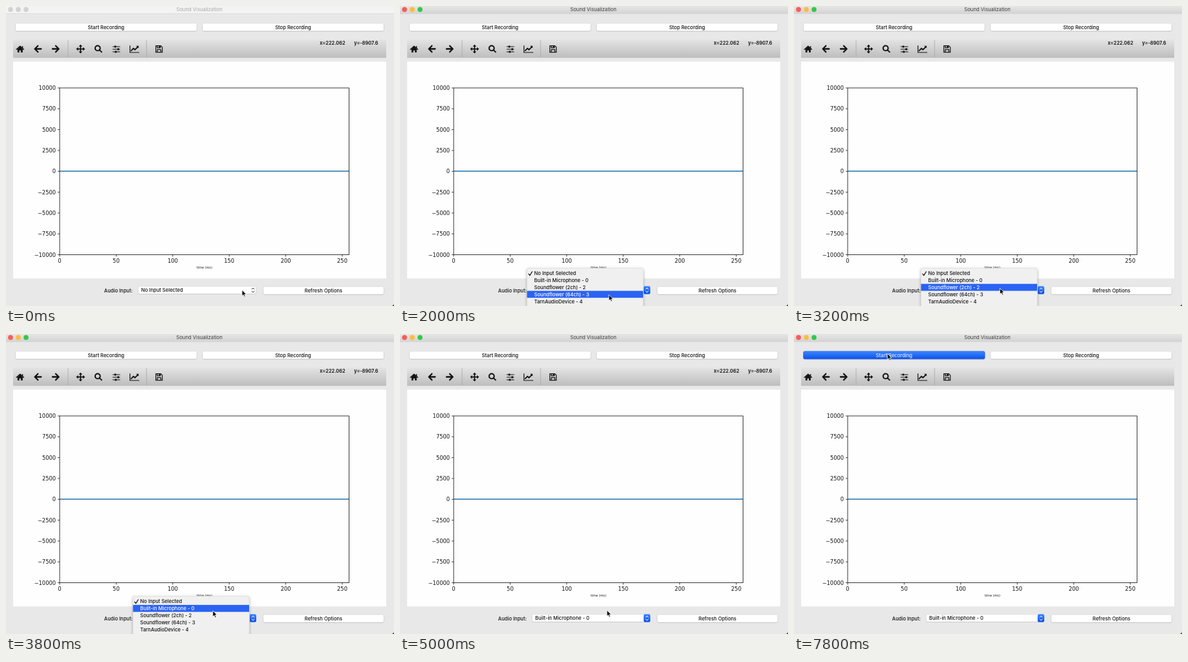
These frames come from a looping animation (600x465 px, 8000 ms). An HTML page:

```html
<!DOCTYPE html>
<html lang="en">
<head>
<meta charset="utf-8">
<title>Sound Visualization</title>
<style>
html, body { margin: 0; width: 100%; height: 100%; overflow: hidden; background: #e8e8e8; }
svg { display: block; width: 600px; height: 465px; }
text { font: 500 7.6px Inter, "Open Sans", sans-serif; fill: #111; white-space: pre; }
.title { font-weight: 400; font-size: 7.7px; }
.coord { font-weight: 600; font-size: 7.45px; }
.tick { font: 8.3px "DejaVu Sans", sans-serif; }
.axis { font: 5px "DejaVu Sans", sans-serif; }
.mid { text-anchor: middle; }
.end { text-anchor: end; }
.line { fill: none; stroke: #111; stroke-linecap: round; stroke-linejoin: round; }
</style>
</head>
<body>
<svg id="stage" viewBox="0 0 600 465">
  <defs>
    <linearGradient id="bar" x2="0" y2="1"><stop stop-color="#e6e5e6"/><stop offset="1" stop-color="#d4d3d4"/></linearGradient>
    <linearGradient id="tools" x2="0" y2="1"><stop stop-color="#e4e4e4"/><stop offset="1" stop-color="#bdbdbd"/></linearGradient>
    <linearGradient id="blue" x2="0" y2="1"><stop stop-color="#3f86fb"/><stop offset="1" stop-color="#0a51ee"/></linearGradient>
    <filter id="shade" x="-10%" y="-20%" width="120%" height="140%"><feDropShadow dx="0" dy="1.5" stdDeviation="2" flood-opacity=".3"/></filter>
  </defs>
</svg>
<script>
const NS = "http://www.w3.org/2000/svg";
const LOOP = 8000, STEP = 200;
const stage = document.getElementById("stage");

function add(tag, attrs, parent = stage) {
  const node = document.createElementNS(NS, tag);
  for (const key in attrs) node.setAttribute(key, attrs[key]);
  return parent.appendChild(node);
}
function rect(x, y, width, height, fill, extra, parent) {
  return add("rect", { x, y, width, height, fill, ...extra }, parent);
}
function label(str, x, y, cls = "", parent) {
  const node = add("text", { x, y, class: cls }, parent);
  node.textContent = str;
  return node;
}
function path(d, attrs, parent) {
  return add("path", { d, ...attrs }, parent);
}
function button(str, x, y, w) {
  rect(x, y + .6, w, 12.2, "#bcbcbc", { rx: 2.4 });
  const face = rect(x + .2, y + .1, w - .4, 12, "#fff", { rx: 2.2, stroke: "#cbcbcb", "stroke-width": .5 });
  const text = label(str, x + w / 2, y + 8.8, "mid");
  return { face, text };
}

// Window frame
rect(0, 0, 600, 465, "#e8e8e8");
const titleBar = rect(0, 0, 600, 12, "url(#bar)");
rect(0, 11.6, 600, .7, "#cfcfcf");
const lights = [7, 19, 31].map(cx => add("circle", { cx, cy: 5.4, r: 3.8 }));
const title = label("Sound Visualization", 299, 8.4, "title mid");

const start = button("Start Recording", 14.3, 26.7, 281);
button("Stop Recording", 303.5, 26.7, 281);
button("Refresh Options", 397.5, 434.9, 187);

// Toolbar
rect(11, 52, 577, 28.3, "url(#tools)");
for (const x of [96, 217.3]) rect(x - .4, 53, .8, 26.5, "#a9a9a9");

function icon(x, y, d, width) {
  const g = add("g", { transform: `translate(${x} ${y})` });
  path(d, width ? { class: "line", "stroke-width": width } : { fill: "#111" }, g);
}
const ARROW = "M-4.6 0H4.8M-.2-4.7L-4.9 0L-.2 4.7";
icon(21.8, 67, "M0-4L-4.6 .2V.4H-4V5H-1.2V1.7H1.2V5H4V.4H4.6V.2Z");
icon(21.8, 67, "M-5.6 .2L0-4.7L5.6 .2M3.7-4.3V-2", 1.5);
icon(49.5, 66.5, ARROW, 2.3);
add("g", { transform: "translate(76.7 66.5) scale(-1 1)" });
path(ARROW, { class: "line", "stroke-width": 2.3 }, stage.lastChild);
icon(115.3, 66.6, "M-5 0H5M0-5V5", 1.8);
icon(115.3, 66.6, "M0-6.8L2.8-3.8H-2.8ZM0 6.8L2.8 3.8H-2.8ZM-6.8 0L-3.8-2.8V2.8ZM6.8 0L3.8-2.8V2.8Z");
icon(142.2, 65.6, "M3.4-.2A3.9 3.9 0 1 1-4.4-.2A3.9 3.9 0 1 1 3.4-.2M2.6 2.8L5.7 5.8", 2);
icon(170.7, 67, "M-5.4-4H5.4M-5.4 0H5.4M-5.4 4H5.4", 1.1);
icon(170.7, 67, "M-3-5.5H-.4V-2.5H-3ZM1.6-1.5H4.2V1.5H1.6ZM-2.2 2.5H.4V5.5H-2.2Z");
icon(198.7, 66.8, "M-7-5.2V5.2H7", 1.2);
icon(198.7, 66.8, "M-5 2.3L-1.6-1.2L.6 1L5-3.4", 1.9);
icon(198.7, 66.8, "M2.6-5H6.4V-1.2Z");
icon(236.7, 66.7, "M-5-5H2.8L5-2.8V5H-5ZM-2.8 5V1H2.8V5M-2.8-5V-1.8H2V-5", 1.2);
icon(236.7, 66.7, "M-.2-4.8H1.6V-2.2H-.2Z");

const coordX = label("", 485.3, 60.2, "coord");
const coordY = label("", 538.3, 60.2, "coord");

// Plot
const AX = { left: 83, top: 127, right: 530.5, bottom: 385.5 };
const PX = (AX.right - AX.left) / 256;
const PY = (AX.bottom - AX.top) / 20000;
const ZERO = (AX.top + AX.bottom) / 2;
rect(11, 86.3, 577, 335.9, "#fefefe");
for (let v = 10000; v >= -10000; v -= 2500) {
  const y = ZERO - v * PY;
  path(`M80 ${y}H83`, { stroke: "#111", "stroke-width": .8 });
  label(String(v).replace("-", "\u2212"), 77, y + 3.1, "tick end");
}
for (let v = 0; v <= 250; v += 50) {
  const x = AX.left + v * PX;
  path(`M${x} 385.5V388.5`, { stroke: "#111", "stroke-width": .8 });
  label(v, x, 397.6, "tick mid");
}
path(`M83 ${ZERO - .2}H530.5`, { stroke: "#1f6fae", "stroke-width": 1.5 });
rect(AX.left, AX.top, AX.right - AX.left, AX.bottom - AX.top, "none", { stroke: "#222", "stroke-width": .9 });
label("time (ms)", 306.8, 407.2, "axis mid");

// Input chooser
label("Audio Input:", 195.8, 443.7, "end");
rect(204, 434.9, 183, 12, "#bcbcbc", { rx: 2.4 });
rect(204.2, 434.4, 182.6, 11.9, "#fff", { rx: 2.2, stroke: "#cbcbcb", "stroke-width": .5 });
const chosen = label("", 209, 442.9);
const knob = rect(376.8, 434.3, 10.2, 12.2, "url(#blue)", { rx: 2.2 });
const chevrons = path("M380.2 439L382 437L383.8 439M380.2 442L382 444L383.8 442", { class: "line", "stroke-width": 1 });

// Drop-down menu
const ROW = 10.8, MENU_TOP = 409.1;
const options = ["No Input Selected", "Built-in Microphone - 0", "Soundflower (2ch) - 2",
  "Soundflower (64ch) - 3", "TarnAudioDevice - 4"];
const menu = add("g", {});
rect(196.2, 406.2, 180, 66, "#f0f0f0", { rx: 3, filter: "url(#shade)", stroke: "#c4c4c4", "stroke-width": .4 }, menu);
const highlight = rect(196.4, 0, 179.6, ROW, "#2a63f3", {}, menu);
const rows = options.map((str, i) => label(str, 207.6, MENU_TOP + i * ROW + 8.2, "", menu));
const check = path("M198.8 415.2L200.8 417.6L204.4 411.8", { class: "line", "stroke-width": 1.2 }, menu);

path("M600 461.5V465H596.5Q599.5 464.5 600 461.5Z", { fill: "#222" });
const cursor = path("M0 0V9.2L2.1 7.2L3.6 10.6L5.2 9.9L3.7 6.6H6.6Z",
  { fill: "#000", stroke: "#fff", "stroke-width": .8, "stroke-linejoin": "round" });

// Pointer: time, x, y
const pointer = [
  [0, 365, 440.3], [800, 364, 440.8], [1000, 358, 441.5], [1200, 349, 442.5], [1400, 340, 443.5],
  [1600, 332, 444.5], [1800, 326, 446], [2000, 323, 447.6], [2200, 322, 451], [2400, 321, 454.5],
  [2600, 321, 453.6], [2800, 320, 446], [3000, 319, 443], [3200, 318.4, 437.5], [3400, 318.6, 434.5],
  [3600, 319.2, 430.5], [3800, 319.8, 429], [4000, 320, 428.3], [6800, 306, 396], [7000, 262, 300],
  [7200, 200, 160], [7400, 158, 60], [7600, 144.4, 30.3]
];
// Highlighted row by time, -1 for none
const hovers = [[600, 0], [1000, 3], [2400, 4], [2800, 3], [3200, 2], [3600, 1], [4400, -1], [4600, 1]];

const at = (table, t) => table.reduce((found, row) => row[0] <= t ? row : found, table[0]);

function showCoords(t, x, y) {
  const inside = x > AX.left && x < AX.right && y > AX.top && y < AX.bottom;
  const before = t < 6800;
  coordX.textContent = before ? "x=222.062" : inside ? "x=" + ((x - AX.left) / PX).toPrecision(6) : "";
  coordY.textContent = before ? "y=-8907.6" : inside ? "y=" + ((ZERO - y) / PY).toFixed(1) : "";
}

function draw(time) {
  const t = Math.floor(time / STEP) * STEP;
  const active = t >= 600, open = active && t < 5000, pressed = t >= 7800;

  titleBar.setAttribute("fill", active ? "url(#bar)" : "#f3f3f3");
  title.style.fill = active ? "#3c3c3c" : "#a8a8a8";
  ["#fc5b57", "#fdbc40", "#34c84a"].forEach((color, i) => lights[i].setAttribute("fill", active ? color : "#d2d2d2"));
  knob.style.display = active ? "" : "none";
  chevrons.style.stroke = active ? "#fff" : "#333";
  chosen.textContent = options[t >= 4800 ? 1 : 0];

  menu.style.display = open ? "" : "none";
  menu.style.opacity = t === 4800 ? .5 : 1;
  const row = at(hovers, t)[1];
  highlight.style.display = row < 0 ? "none" : "";
  highlight.setAttribute("y", MENU_TOP + row * ROW);
  rows.forEach((node, i) => node.style.fill = i === row ? "#fff" : "#111");
  check.style.stroke = row === 0 ? "#fff" : "#111";

  start.face.setAttribute("fill", pressed ? "url(#blue)" : "#fff");
  start.face.setAttribute("stroke", pressed ? "#1553d8" : "#cbcbcb");
  start.text.style.fill = pressed ? "#e4edff" : "#111";

  const [, x, y] = at(pointer, t);
  cursor.setAttribute("transform", `translate(${x} ${y})`);
  showCoords(t, x, y);
}

const begin = performance.now();
function tick() {
  draw((performance.now() - begin) % LOOP);
  requestAnimationFrame(tick);
}
tick();
</script>
</body>
</html>
```
